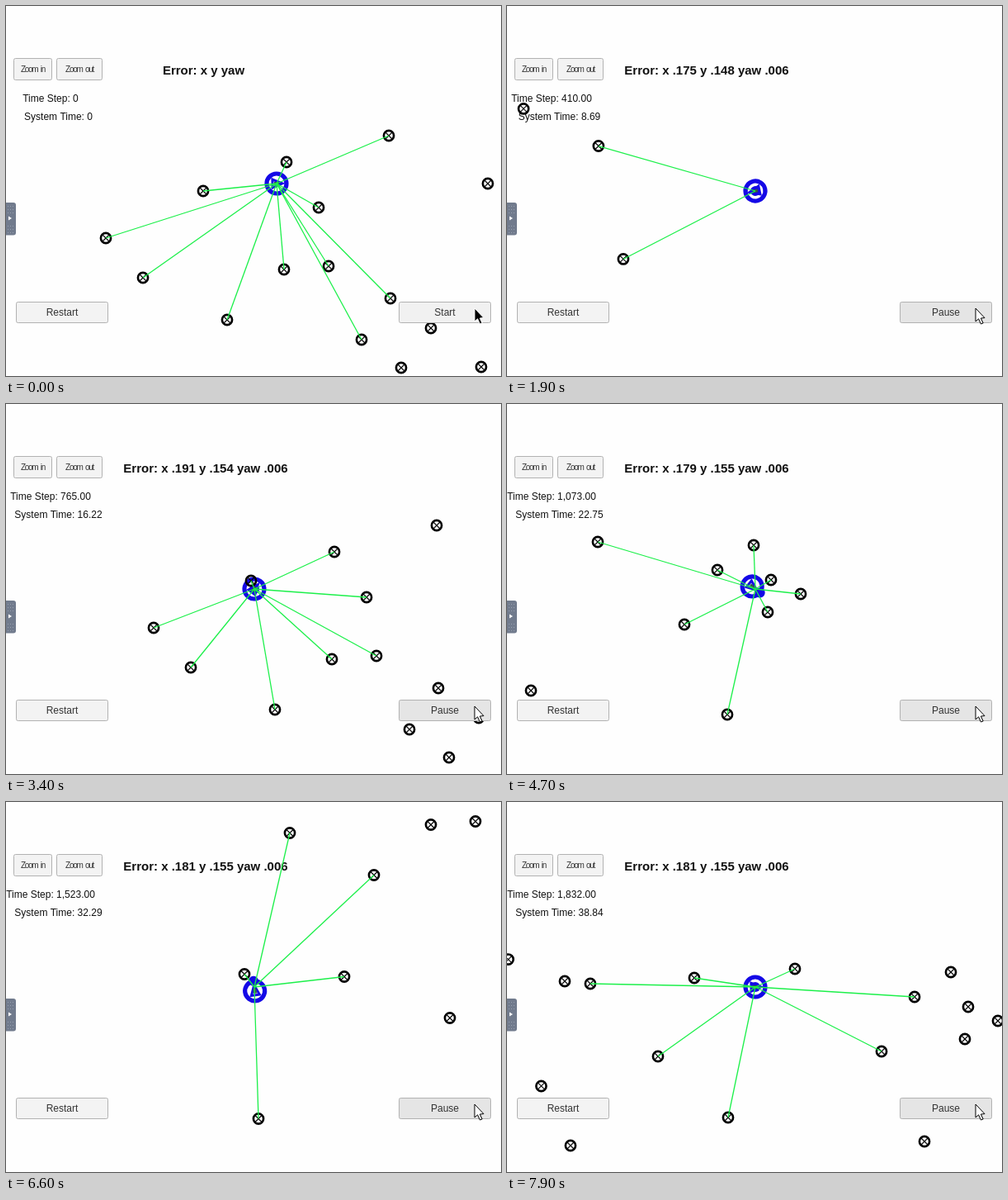
Animation of 600x448 px, one loop 8 s. Source, as an HTML page with a canvas:

```html
<!DOCTYPE html>
<html lang="en">
<head>
<meta charset="utf-8">
<title>Robot localisation</title>
<style>
html, body { margin: 0; width: 100%; height: 100%; overflow: hidden; background: #fefefe; }
canvas { display: block; }
</style>
</head>
<body>
<canvas id="stage" width="600" height="448"></canvas>
<script>
const ctx = document.getElementById('stage').getContext('2d');
const LOOP = 8000, STEP = 100, START = 75, LAP = 3450;
const CENTER = [301, 224], RANGE = 228;
const FONT = '"Liberation Sans", Arial, sans-serif';

// Closed track through a few key points: time in the lap, x, y
const track = [
  [0,328,215], [925,1076,218], [1025,1150,215.5], [1175,1315,253], [1370,1395,400],
  [1700,1250,620], [2200,760,690], [2625,338,652], [3075,123,515.5], [3325,243,234]
];

// Landmarks on the two ends of the course; the straights between are scattered
const landmarks = [
  [464,157], [340,189], [239,224], [379,244], [584,215], [121,281], [166,329], [268,380],
  [337,319], [391,315], [466,354], [431,404], [515,390], [479,438], [576,437],
  [540,473], [612,577], [232,503], [360,553], [368,662], [128,675], [111,500],
  [845,211], [876,214], [1002,207], [1124,196], [1313,200], [1269,230], [1334,242],
  [1370,259], [1330,281], [1229,296], [958,302], [1043,376], [1281,405], [852,410],
  ...scatter(4, 640, 830, 130, 420), ...scatter(6, 680, 1035, 540, 740)
];

function scatter(count, left, right, top, bottom) {
  let seed = count;
  const random = () => (seed = seed * 16807 % 2147483647) / 2147483647;
  random();
  return Array.from({ length: count }, (_, i) => [
    left + (right - left) * (i + random()) / count,
    top + (bottom - top) * random()
  ]);
}

function knot(i) {
  const n = track.length, lap = Math.floor(i / n);
  const [t, x, y] = track[i - lap * n];
  return [t + lap * LAP, x, y];
}

// Cubic Hermite curve with the key times as its parameter
function robotAt(time) {
  const t = time % LAP;
  let i = track.length - 1;
  while (track[i][0] > t) i--;
  const [a, b, c, d] = [-1, 0, 1, 2].map(k => knot(i + k));
  const h = c[0] - b[0], u = (t - b[0]) / h;
  return [1, 2].map(k => {
    const m0 = (c[k] - a[k]) / (c[0] - a[0]) * h;
    const m1 = (d[k] - b[k]) / (d[0] - b[0]) * h;
    return b[k] + u * (m0 + u * (3 * (c[k] - b[k]) - 2 * m0 - m1
      + u * (2 * (b[k] - c[k]) + m0 + m1)));
  });
}

function text(str, x, y, size, weight = '', color = '#111', squeeze = 0) {
  ctx.font = `${weight} ${size}px ${FONT}`;
  ctx.letterSpacing = -squeeze + 'px';
  ctx.wordSpacing = 1.5 * squeeze + 'px';
  ctx.fillStyle = color;
  ctx.textAlign = 'center';
  ctx.fillText(str, x, y);
}

function disc(x, y, r) {
  ctx.beginPath();
  ctx.arc(x, y, r, 0, 2 * Math.PI);
}

function line(x1, y1, x2, y2) {
  ctx.beginPath();
  ctx.moveTo(x1, y1);
  ctx.lineTo(x2, y2);
  ctx.stroke();
}

function polygon(points) {
  ctx.beginPath();
  points.forEach(p => ctx.lineTo(...p));
  ctx.closePath();
}

function landmark([x, y]) {
  ctx.strokeStyle = '#000';
  ctx.lineWidth = 2.6;
  disc(x, y, 6.1);
  ctx.stroke();
  ctx.lineWidth = 1.1;
  line(x - 4, y - 4, x + 4, y + 4);
  line(x - 4, y + 4, x + 4, y - 4);
}

function robot(x, y, angle, spread) {
  ctx.save();
  ctx.translate(x, y);
  ctx.rotate(angle);
  ctx.fillStyle = ctx.strokeStyle = '#1408e6';
  if (spread) {
    disc(9 * spread, 0, 6);
    ctx.fill();
  }
  ctx.translate(-6 * spread, 0);
  ctx.lineWidth = 5.2;
  disc(0, 0, 12);
  ctx.stroke();
  ctx.lineWidth = 3;
  polygon([[7, 0], [-5, -5], [-5, 5]]);
  ctx.stroke();
  ctx.fillStyle = '#35584a';
  ctx.fillRect(-3, -2, 6, 4);
  ctx.restore();
}

function button(label, x, y, w, h, fill = '#f3f3f3', size = 12, squeeze = 0) {
  ctx.beginPath();
  ctx.roundRect(x + .5, y + .5, w - 1, h - 1, 2);
  ctx.fillStyle = fill;
  ctx.fill();
  ctx.strokeStyle = '#b2b2b2';
  ctx.lineWidth = 1;
  ctx.stroke();
  text(label, x + w / 2, y + h / 2 + size * .36, size, '', '#333', squeeze);
}

function sideHandle() {
  ctx.beginPath();
  ctx.roundRect(-4, 238, 16, 39.5, 3);
  ctx.fillStyle = '#717b8d';
  ctx.fill();
  ctx.fillStyle = '#98a1b0';
  for (let y = 242; y < 275; y += 4) {
    if (Math.abs(y - 257) < 6) continue;
    for (let x = 2; x < 10; x += 3) ctx.fillRect(x, y, 1, 1);
  }
  ctx.fillStyle = '#fff';
  polygon([[3, 254.5], [7, 257], [3, 259.5]]);
  ctx.fill();
}

function pointer(running) {
  ctx.save();
  ctx.translate(568, 366);
  polygon([[0, 0], [0, 16], [3.6, 12.8], [6.4, 19], [9.2, 18], [6.4, 12], [11, 11.6]]);
  ctx.fillStyle = running ? '#fff' : '#000';
  ctx.strokeStyle = running ? '#000' : '#fff';
  ctx.lineWidth = 1;
  ctx.fill();
  ctx.stroke();
  ctx.restore();
}

function labels(t, running) {
  let error = 'x y yaw', step = '0', clock = '0';
  if (running) {
    const count = Math.max(0, Math.round(.237 * (t - 172)));
    // Errors settle: x swings around its limit, y approaches it
    const x = .181 + .112 * Math.exp(-t / 1400) * Math.sin(Math.PI * (t - 2050) / 2300);
    const y = .155 - .06 * Math.exp(-t / 870);
    const yaw = .006 - .003 * Math.exp(-t / 800);
    const short = v => v.toFixed(3).slice(1);
    error = `x ${short(x)} y ${short(y)} yaw ${short(yaw)}`;
    step = count.toLocaleString('en-US') + '.00';
    clock = (count * .0212).toFixed(2);
  }
  text('Error: ' + error, running ? 242 : 239.5, 83, 15, 'bold');
  text('Time Step: ' + step, 54, 115.5, 12);
  text('System Time: ' + clock, 63.5, 138, 12);
}

function draw(t) {
  const running = t >= STEP;
  const phase = Math.max(0, t - START);
  const pos = robotAt(phase), next = robotAt(phase + 10);
  const [cx, cy] = running ? CENTER : pos;
  const heading = Math.atan2(next[1] - pos[1], next[0] - pos[0]);
  const swing = Math.abs(Math.sin(Math.PI * (t - 400) / 1500));
  const spread = running ? Math.min(1, 2 * swing) : 0;

  ctx.fillStyle = '#fefefe';
  ctx.fillRect(0, 0, 600, 448);
  labels(t, running);

  const seen = landmarks.map(([x, y]) => [x - pos[0] + cx, y - pos[1] + cy]);
  robot(cx, cy, heading, spread);
  seen.forEach(landmark);
  ctx.strokeStyle = '#1cf04a';
  ctx.lineWidth = 1.3;
  for (const [x, y] of seen)
    if (Math.hypot(x - cx, y - cy) < RANGE) line(cx, cy, x, y);

  button('Zoom in', 9, 63, 47, 27, '#f3f3f3', 10, 1.3);
  button('Zoom out', 61, 63, 56, 27, '#f3f3f3', 10, 1.3);
  button('Restart', 12, 358, 112, 26);
  button(running ? 'Pause' : 'Start', 476, 358, 112, 26, running ? '#e5e5e5' : '#f1f1f1');
  sideHandle();
  pointer(running);
}

const begin = performance.now();
function frame() {
  const t = (performance.now() - begin) % LOOP;
  draw(Math.floor(t / STEP) * STEP);
  requestAnimationFrame(frame);
}
frame();
</script>
</body>
</html>
```
